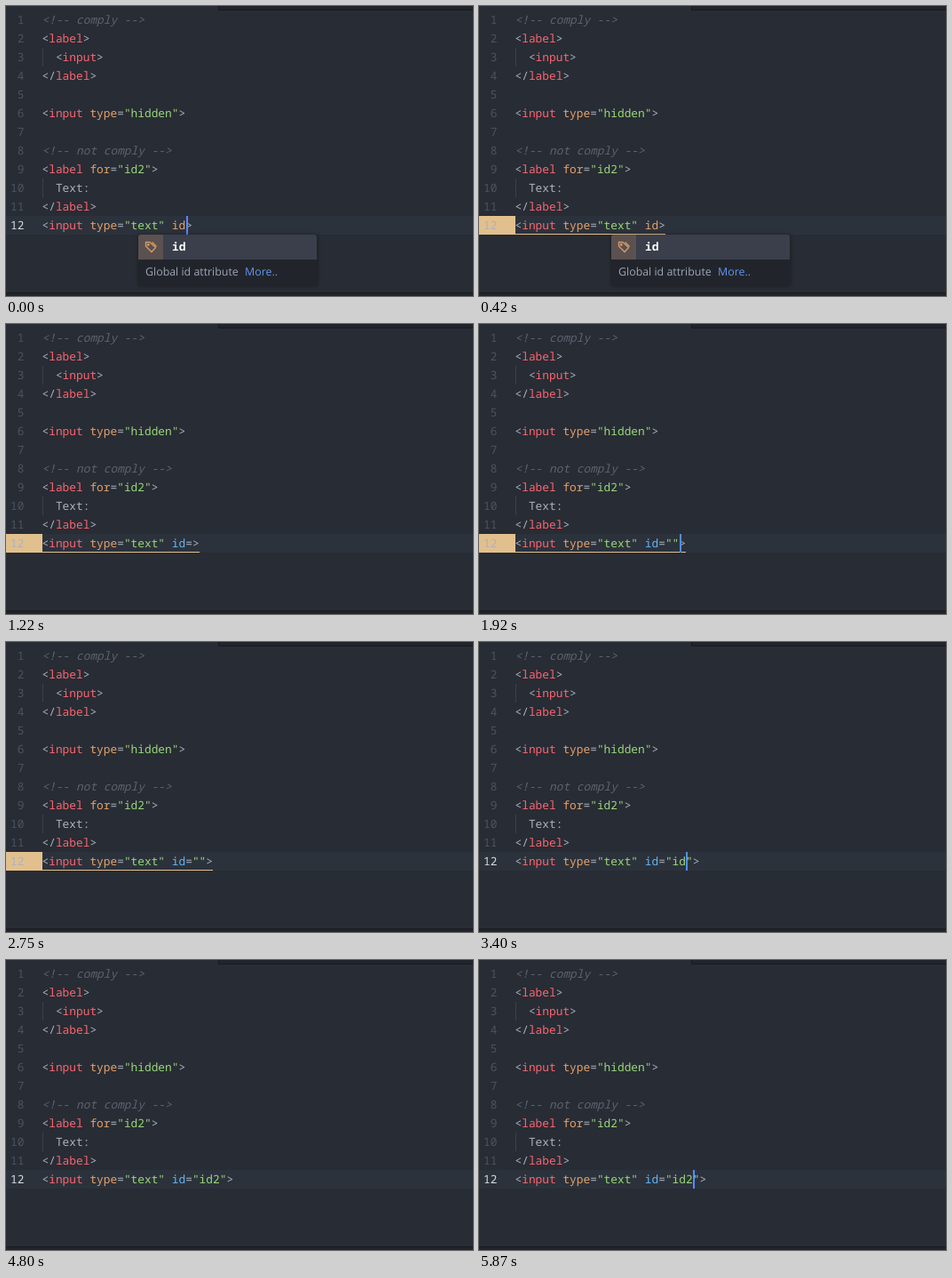
Animation, 526 px wide and 326 px high, one loop 7120 ms. Source, as an HTML page:

```html
<!DOCTYPE html>
<html lang="en">
<head>
<meta charset="utf-8">
<title>Editor typing</title>
<style>
  html, body { margin: 0; width: 100%; height: 100%; overflow: hidden; background: #282c34; }
  svg { display: block; }
  text { white-space: pre; text-rendering: geometricPrecision; }
  .code, .num, .item { font: 12.83px "Noto Sans Mono", monospace; }
  .code { fill: #abb2bf; }
  .num { fill: #4b5364; text-anchor: end; }
  .num.active { fill: #d7dae0; }
  .num.flagged { fill: #abb2bf; }
  .comment { fill: #5c6370; font-style: italic; }
  .tag { fill: #fb6570; }
  .string { fill: #98d77a; }
  .id { fill: #61b6fa; }
  .attr { fill: #e5a26b; }
  .item { fill: #fff; font-weight: 700; }
  .hint { font: 12.4px "Open Sans", sans-serif; fill: #9da5b4; }
  .link { fill: #6494ed; }
  #popup { filter: drop-shadow(0 0 2px rgba(0, 0, 0, .35)); }
</style>
</head>
<body>
<svg width="526" height="326" viewBox="0 0 526 326">
  <rect width="526" height="326" fill="#282c34"/>
  <path d="M239 0H526V5H239Z" fill="#21252b"/>
  <path d="M239.5 0V4.5H526" fill="none" stroke="#181a1f"/>
  <path d="M0 322H526V326H0Z" fill="#21252b"/>
  <path d="M0 322.5H526" stroke="#181a1f"/>
  <rect y="236" width="526" height="21" fill="#2c323b"/>
  <path d="M41.5 47V68M41.5 194V215" stroke="#3c414b"/>
  <g id="flag" fill="#e2c08d">
    <rect y="236" width="41" height="21"/>
    <rect id="underline" x="41" y="256" height="1"/>
  </g>
  <g id="lines"></g>
  <rect id="cursor" y="236" width="2" height="21" fill="#528bff"/>
  <g id="popup">
    <rect x="149" y="257" width="202" height="58" rx="4" fill="#21252b"/>
    <path d="M149 285V260Q149 257 152 257H347Q350 257 350 260V285Z" fill="#3a3f4b"/>
    <path d="M149 285V260Q149 257 152 257H177V285Z" fill="#5a5150"/>
    <g fill="none" stroke="#d19a66" stroke-width="1.4" stroke-linejoin="round">
      <path d="M157.5 265.5H162L168.5 271.5L164 276.5L157.5 270Z"/>
      <path d="M164.5 265.5L169.5 270.5"/>
      <circle cx="160.2" cy="268.2" r=".8"/>
    </g>
    <text class="item" x="187" y="275">id</text>
    <text class="hint" x="157" y="303">Global id attribute</text>
    <text class="hint link" x="269" y="303">More..</text>
  </g>
</svg>
<script>
const NS = 'http://www.w3.org/2000/svg';
const LOOP = 7120, LEFT = 40.5, CHAR = 7.7, ROW = 21;
const $ = id => document.getElementById(id);

const head = '<input type="text" ';
const lines = [
  '<!-- comply -->', '<label>', '  <input>', '</label>', '',
  '<input type="hidden">', '', '<!-- not comply -->',
  '<label for="id2">', '  Text:', '</label>', ''
];

// time, typed attribute, cursor column (0 = hidden), warning shown
const steps = [
  [0, 'id', 21, 0],
  [270, 'id', 21, 1],
  [420, 'id', 0, 1],
  [830, 'id=', 22, 0],
  [970, 'id=', 22, 1],
  [1220, 'id=', 0, 1],
  [1370, 'id=""', 23, 0],
  [1520, 'id=""', 24, 0],
  [1920, 'id=""', 24, 1],
  [2040, 'id=""', 0, 1],
  [2190, 'id=""', 23, 1],
  [2750, 'id=""', 0, 1],
  [3120, 'id=""', 23, 1],
  [3270, 'id="i"', 24, 0],
  [3400, 'id="id"', 25, 0],
  [3680, 'id="id"', 25, 1],
  [3960, 'id="id"', 0, 1],
  [4240, 'id="id2"', 26, 0],
  [4800, 'id="id2"', 0, 0],
  [5200, 'id="id2"', 26, 0],
  [5470, 'id="id2"', 0, 0],
  [5870, 'id="id2"', 26, 0]
];

const token = /(?<comment><!--.*?-->)|(?<tag>(?<=<\/?)\w+)|(?<string>"[^"]*")|(?<id>\bid(?==))|(?<attr>(?<= )(?:type|for|id)\b)/g;

function add(parent, name, attrs, content = '') {
  const el = document.createElementNS(NS, name);
  for (const key in attrs) el.setAttribute(key, attrs[key]);
  el.textContent = content;
  return parent.appendChild(el);
}

function highlight(el, code) {
  el.textContent = '';
  let pos = 0;
  for (const m of code.matchAll(token)) {
    const kind = Object.keys(m.groups).find(k => m.groups[k] !== undefined);
    el.append(code.slice(pos, m.index));
    add(el, 'tspan', { class: kind }, m[0]);
    pos = m.index + m[0].length;
  }
  el.append(code.slice(pos));
}

let number, typed;
lines.forEach((code, i) => {
  const y = 20 + i * ROW;
  number = add($('lines'), 'text', { class: 'num', x: 20.5, y }, i + 1);
  typed = add($('lines'), 'text', { class: 'code', x: LEFT, y });
  highlight(typed, code);
});

const show = (el, on) => el.setAttribute('visibility', on ? 'visible' : 'hidden');

function render([, attr, col, flagged]) {
  const code = head + attr + '>';
  highlight(typed, code);
  number.setAttribute('class', flagged ? 'num flagged' : 'num active');
  show($('flag'), flagged);
  $('underline').setAttribute('width', Math.round(LEFT + code.length * CHAR) - 41);
  show($('cursor'), col);
  $('cursor').setAttribute('x', Math.ceil(LEFT + col * CHAR - 0.01));
  show($('popup'), attr === 'id');
}

let current;
const start = performance.now();
function tick() {
  const t = Math.max(0, performance.now() - start) % LOOP;
  const step = steps.findLast(s => s[0] <= t);
  if (step !== current) render(current = step);
  requestAnimationFrame(tick);
}
tick();
</script>
</body>
</html>
```
